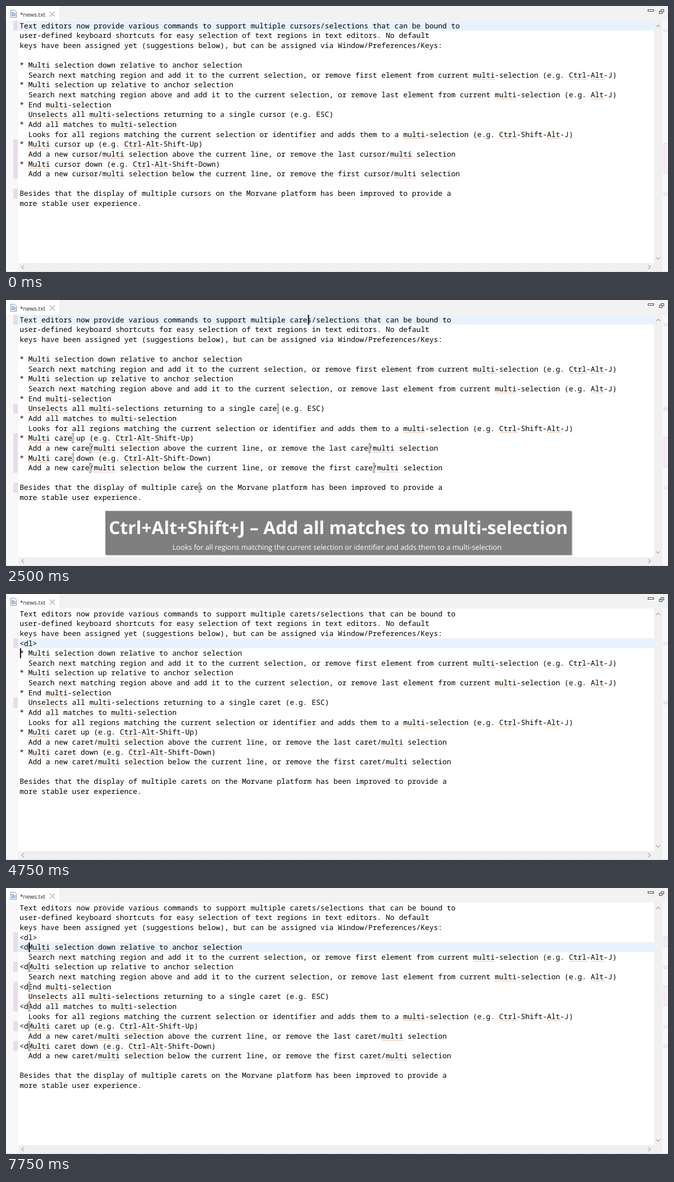
An HTML page that plays this animation: 1179x475 px, repeating every 8000 ms.

```html
<!DOCTYPE html>
<html lang="en">
<head>
<meta charset="utf-8">
<title>Multi-selection in a text editor</title>
<style>
  html, body { margin: 0; width: 100%; height: 100%; overflow: hidden; background: #fff; }
  svg { display: block; width: 1179px; height: 475px; }
  text { white-space: pre; text-rendering: geometricPrecision; }
  .code { font: 12.95px "Noto Sans Mono", monospace; fill: #000; }
  .ui { font-family: "Open Sans", "Noto Sans", sans-serif; }
  .banner { fill: #fff; }
  .squiggle { fill: none; stroke: #f2a27e; stroke-width: .8; }
  .arrow { fill: none; stroke: #a3a3a3; stroke-width: 1.1; }
</style>
</head>
<body>
<svg viewBox="0 0 1179 475">
  <rect width="1179" height="26" fill="#f2f2f2"/>
  <rect width="96" height="26" fill="#fff"/>
  <path d="M96.5 0V26" stroke="#e4e4e4"/>
  <rect y="26" width="22" height="449" fill="#f8f8f8"/>
  <rect x="1154" y="26" width="15" height="433" fill="#f0f0f0"/>
  <rect x="1169" y="26" width="10" height="449" fill="#f8f8f8"/>
  <rect x="22" y="459" width="1132" height="15" fill="#f0f0f0"/>
  <rect x="1154" y="459" width="15" height="15" fill="#f0f0f0"/>
  <path d="M0 474.5H1179" stroke="#d4d4d4" stroke-dasharray="4 2"/>
  <path d="M8.5 7.5H15.5L18.5 10.5V20.5H8.5Z" fill="#fdfdfa" stroke="#7f93ad"/>
  <path d="M10 11.5H14M10 13.5H17M10 15.5H17M10 17.5H17" stroke="#4f86c6"/>
  <text class="ui" x="25" y="18.7" font-size="10.1" fill="#222">*news.txt</text>
  <path d="M78 10L87 19M87 10L78 19" stroke="#777"/>
  <g fill="#fff" stroke="#444">
    <rect x="1143.5" y="6.5" width="10" height="3"/>
    <rect x="1166.5" y="6.5" width="5" height="4"/>
    <rect x="1163.5" y="9.5" width="5" height="4"/>
  </g>
  <path class="arrow" d="M1158 37.5l3.5-3.5l3.5 3.5M1158 449l3.5 3.5l3.5-3.5M31.5 463l-3.5 3.5l3.5 3.5M1144 463l3.5 3.5l-3.5 3.5"/>
  <g id="view"></g>
</svg>
<script>
const LEFT = 24.3, TOP = 26.4, COL = 7.77, ROW = 17.64, LOOP = 8000;
const LINES = `Text editors now provide various commands to support multiple cursors/selections that can be bound to
user-defined keyboard shortcuts for easy selection of text regions in text editors. No default
keys have been assigned yet (suggestions below), but can be assigned via Window/Preferences/Keys:

* Multi selection down relative to anchor selection
  Search next matching region and add it to the current selection, or remove first element from current multi-selection (e.g. Ctrl-Alt-J)
* Multi selection up relative to anchor selection
  Search next matching region above and add it to the current selection, or remove last element from current multi-selection (e.g. Alt-J)
* End multi-selection
  Unselects all multi-selections returning to a single cursor (e.g. ESC)
* Add all matches to multi-selection
  Looks for all regions matching the current selection or identifier and adds them to a multi-selection (e.g. Ctrl-Shift-Alt-J)
* Multi cursor up (e.g. Ctrl-Alt-Shift-Up)
  Add a new cursor/multi selection above the current line, or remove the last cursor/multi selection
* Multi cursor down (e.g. Ctrl-Alt-Shift-Down)
  Add a new cursor/multi selection below the current line, or remove the first cursor/multi selection

Besides that the display of multiple cursors on the Morvane platform has been improved to provide a
more stable user experience.`.split("\n");

const BULLETS = [5, 7, 9, 11, 13, 15];
const ADD_ALL = {
  x: 177, w: 830, tx: 183, size: 31.8,
  title: "Ctrl+Alt+Shift+J – Add all matches to multi-selection",
  note: "Looks for all regions matching the current selection or identifier and adds them to a multi-selection"
};
const ADD_NEXT = {
  x: 145, w: 893, tx: 150, size: 31.2,
  title: "Alt+J – Multi selection down relative to anchor selection",
  note: "Search next matching region and add it to the current selection, or remove first element from current multi-selection"
};

// Every [line, column] where the edited word starts
function wordSpots(word) {
  const spots = [];
  LINES.forEach((line, i) => {
    [...line.matchAll(/cursor/g)].forEach((m, k) =>
      spots.push([i + 1, m.index + k * (word.length - 6)]));
  });
  return spots;
}
const ends = word => wordSpots(word).map(([line, col]) => [line, col + word.length]);
const typeWord = word => ({ word, sel: [], main: [1, 62 + word.length], carets: ends(word).slice(1) });
const bulletSel = n => ({
  sel: BULLETS.slice(0, n).map(line => [line, 0, 2]),
  carets: BULLETS.slice(1, n).map(line => [line, 2])
});
const typeBullet = bullet => ({
  bullet, sel: [], banner: null, main: [5, bullet.length],
  carets: BULLETS.slice(1).map(line => [line, bullet.length]),
  marks: [[4, 2], [7, 1], [9, 3], [13, 1], [15, 1]]
});

// Each step changes part of the state; the rest carries over
const STEPS = [
  [0, { word: "cursor", tag: "", bullet: "* ", row: 1, sel: [], carets: [], main: null,
        banner: null, marks: [[1, 1], [13, 4], [18, 1]] }],
  [250, { main: [1, 62] }],
  [500, { main: null, sel: [[1, 62, 6]] }],
  [1250, { banner: ADD_ALL }],
  [1500, { main: [15, 14], carets: ends("cursor").slice(1).filter(([line]) => line !== 15),
           sel: wordSpots("cursor").map(([l, c]) => [l, c, 6, c === 12]) }],
  [1750, { ...typeWord("c"), marks: [[1, 1], [10, 1], [13, 4], [18, 1]] }],
  [2000, typeWord("car")],
  [2500, typeWord("care")],
  [2750, typeWord("caret")],
  [3000, { banner: null }],
  [3250, { row: 3, main: [20, 0], marks: [[10, 1]],
           carets: [[12, 36], [15, 13], [16, 17], [16, 45], [17, 0], [18, 0]] }],
  [3500, { row: 4, main: [4, 0], carets: [] }],
  [3750, { tag: "<d", main: [4, 2], marks: [[4, 1], [10, 1]] }],
  [4000, { tag: "<dl>", main: [4, 4] }],
  [4750, { main: [5, 0] }],
  [5000, { row: 5 }],
  [5500, { main: null, sel: [[5, 0, 1]] }],
  [5750, bulletSel(1)],
  [6000, { banner: ADD_NEXT }],
  [6250, bulletSel(2)],
  [6500, bulletSel(3)],
  [6750, bulletSel(4)],
  [7000, bulletSel(5)],
  [7250, bulletSel(6)],
  [7500, typeBullet("<")],
  [7750, typeBullet("<d")]
];

const rowY = line => TOP + (line - 1) * ROW;
const colX = col => LEFT + col * COL;
const esc = s => s.replace(/&/g, "&amp;").replace(/</g, "&lt;");
const rect = (x, y, w, h, fill, more = "") =>
  `<rect x="${x}" y="${y}" width="${w}" height="${h}" fill="${fill}" ${more}/>`;

function mark([line, count]) {
  const y = Math.max(42, 16 + ROW * line);
  const tint = line === 10 ? "#e9e6f6" : "#f5ecf6";
  return rect(13, rowY(line), 8, count * ROW, "#e9dbeb") +
    rect(1171.5, y, 9, Math.max(4, (count - 1) * ROW), tint, 'stroke="#e2d3e5" stroke-width=".8"');
}

function squiggle(line, col, length) {
  const y = rowY(line) + 15.6, n = Math.round(length * COL / 2);
  let d = `M${colX(col)} ${y}`;
  for (let i = 0; i < n; i++) d += `l2 ${i % 2 ? -1 : 1}`;
  return `<path class="squiggle" d="${d}"/>`;
}

function textLine(text, line, sel) {
  let out = "", body = "", at = 0;
  for (const m of text.matchAll(/[Mm]ulti\b|Ctrl|Alt|Unselects/g))
    out += squiggle(line, m.index, m[0].length);
  for (const [, col, length, dark] of sel.filter(s => s[0] === line)) {
    out += rect(colX(col), rowY(line), length * COL, ROW, "#0078d7");
    body += esc(text.slice(at, col)) +
      `<tspan fill="${dark ? "#000" : "#fff"}">${esc(text.slice(col, col + length))}</tspan>`;
    at = col + length;
  }
  body += esc(text.slice(at));
  return out + `<text class="code" xml:space="preserve" x="${LEFT}" y="${rowY(line) + 13.2}">${body}</text>`;
}

const caret = ([line, col]) =>
  rect(colX(col) + .4, rowY(line) + .5, 2.5, ROW - 1, "#fff", 'fill-opacity=".8" stroke="#444" stroke-width=".7"');

const banner = b =>
  rect(b.x + 2, 379, b.w, 77.5, "#c4c4c4") + rect(b.x, 376.6, b.w + .4, 78.6, "#7f7f7f") +
  `<text class="ui banner" x="${b.tx}" y="418" font-size="${b.size}" font-weight="700">${b.title}</text>` +
  `<text class="ui banner" x="589.5" y="446" font-size="12.74" text-anchor="middle">${b.note}</text>`;

function draw(s) {
  const text = LINES.map((line, i) =>
    i === 3 ? s.tag : line.replace(/^\* /, s.bullet).replaceAll("cursor", s.word));
  return rect(22, rowY(s.row), 1132, ROW, "#e8f2fe") +
    s.marks.map(mark).join("") +
    text.map((t, i) => textLine(t, i + 1, s.sel)).join("") +
    s.carets.map(caret).join("") +
    (s.main ? rect(colX(s.main[1]) + .6, rowY(s.main[0]), 1.9, ROW, "#000") : "") +
    (s.banner ? banner(s.banner) : "");
}

const view = document.getElementById("view");
const start = performance.now();
let shown = 0;
function tick() {
  const t = (performance.now() - start) % LOOP;
  const past = STEPS.filter(([at]) => at <= t);
  if (past.length !== shown) {
    shown = past.length;
    view.innerHTML = draw(Object.assign({}, ...past.map(p => p[1])));
  }
  requestAnimationFrame(tick);
}
tick();
</script>
</body>
</html>
```
